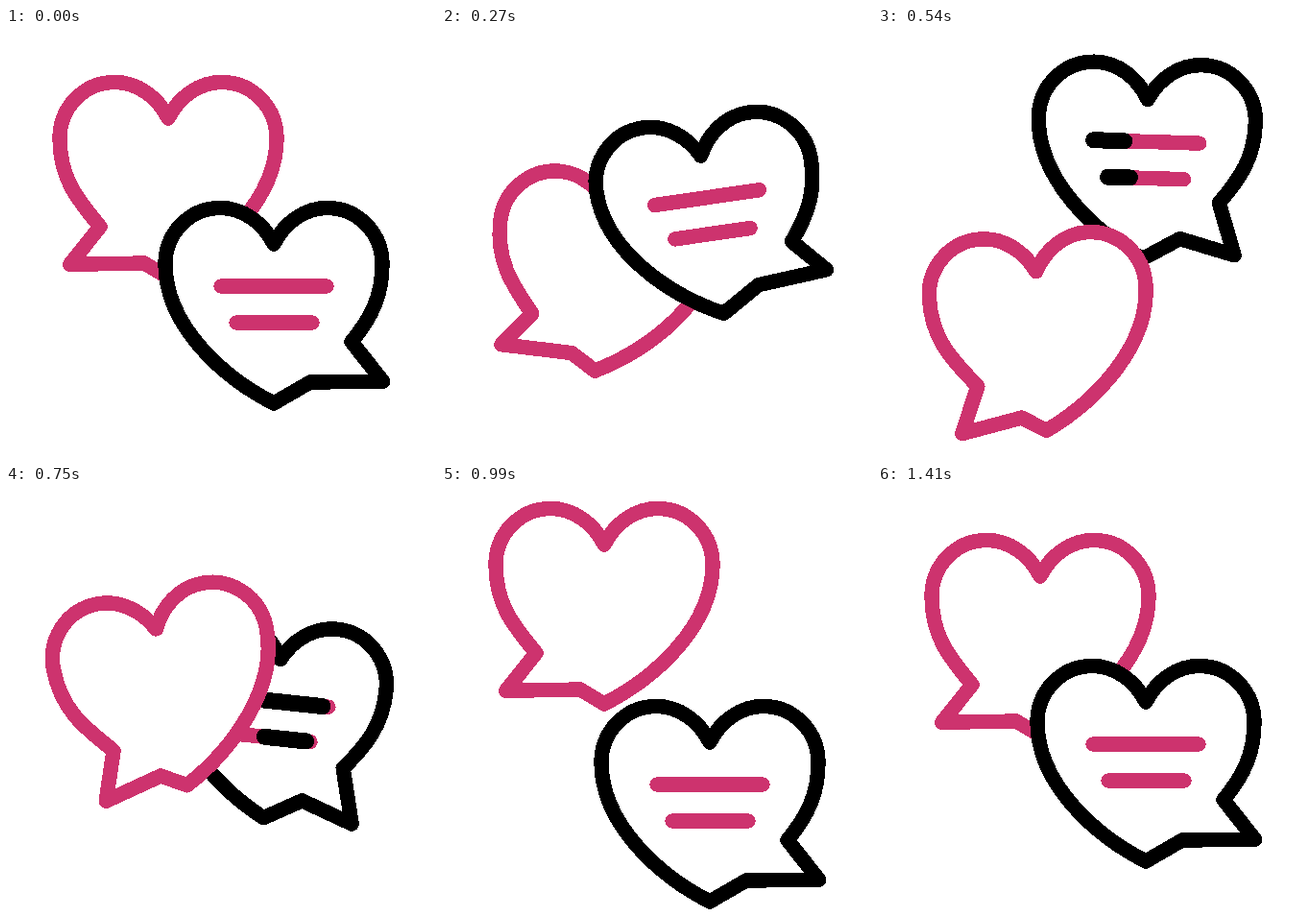
Recreate the animation shown at these times as an HTML page. Size 448x448 px, loop 1.5 s.

```html
<!DOCTYPE html>
<html lang="en">
<head>
<meta charset="utf-8">
<title>Chat hearts</title>
<style>
  html, body { margin: 0; width: 100%; height: 100%; overflow: hidden; background: #fff; }
  svg { display: block; width: 100%; height: 100%; }
  path { fill: none; stroke-width: 15.4; stroke-linecap: round; stroke-linejoin: round; shape-rendering: crispEdges; }
  .heart { fill: #fff; }
  .pink { stroke: #cd336e; }
  .black { stroke: #000; }
  .sweep { stroke-width: 17; }
</style>
</head>
<body>
<svg viewBox="0 0 448 448">
  <g id="pink"><path class="heart pink"/></g>
  <g id="black">
    <path class="heart black"/>
    <path class="pink" d="M-55 -21H55M-39 17H40"/>
    <path class="black sweep"/>
  </g>
</svg>
<script>
const LOOP = 1500, STEP = 30;
const svg = document.querySelector('svg');
const sweep = document.querySelector('.sweep');

// Half of the heart's top, from the notch round to the widest point.
const LOBE = [[0, -65], [11, -87], [32, -102.5], [55.5, -102.5], [88, -102.5], [113, -76], [113, -44]];

// Each heart rests, swings to two extremes and comes back.
// The tail hangs between an inner and an outer joint.
const hearts = [
  { id: 'pink', x: 169, y: 159, side: -1, inner: [25, 86], outer: [71, 48],
    lift: [175, -33], turn: [5.8, -12.2], turnAt: [217, 838], bend: [-6, 21] },
  { id: 'black', x: 279, y: 290, side: 1, inner: [38, 79], outer: [81, 37],
    lift: [-166, 42], turn: [-9, 6.2], turnAt: [200, 728], bend: [-10, 30] }
];

function ease(t, from, to) {
  const u = Math.min(1, Math.max(0, (t - from) / (to - from)));
  return u * u * (3 - 2 * u);
}

// Zero at start, a at t1, b at t2, zero again at end.
function swing(t, [a, b], [t1, t2], start = 60, end = 990) {
  return a * ease(t, start, t1) + (b - a) * ease(t, t1, t2) - b * ease(t, t2, end);
}

function tailPoints({ inner, outer, bend }, t) {
  const b = swing(t, bend, [150, 690]);
  const up = Math.min(b, 0) * 0.45, down = Math.max(b, 0) * 0.15;
  const [ix, iy] = [inner[0] - up, inner[1] + up];
  const [ox, oy] = [outer[0] - down, outer[1] + down];
  const size = 58 - 7 * (ease(t, 150, 360) - ease(t, 750, 990));
  const angle = (20.5 + b) * Math.PI / 180;
  const tip = [(ix + ox) / 2 + size * Math.cos(angle), (iy + oy) / 2 + size * Math.sin(angle)];
  return [[ix, iy], tip, [ox, oy]];
}

function outline(side, tail) {
  const flip = s => ([x, y]) => [x * s, y];
  const plain = LOBE.map(flip(-side));
  const belly = [[113, 20], [53, 74], [0, 101]].map(flip(-side));
  const [ox, oy] = tail[2];
  const flank = [[ox + 22, oy - 27], [113, oy - 49]].map(flip(side));
  const back = LOBE.map(flip(side)).reverse();
  return `M${plain[0]}C${plain.slice(1).join(' ')} ${belly.join(' ')}` +
    `L${tail.map(flip(side)).join(' ')}C${flank.join(' ')} ${back.join(' ')}Z`;
}

function segment(left, right, y, a, b) {
  const w = right - left;
  return `M${left + w * a} ${y}H${left + w * b}`;
}

function draw(t) {
  for (const h of hearts) {
    const g = document.getElementById(h.id);
    const dy = swing(t, h.lift, [450, 990], 60, 1410);
    const deg = swing(t, h.turn, h.turnAt);
    g.setAttribute('transform', `translate(${h.x} ${h.y + dy}) rotate(${deg})`);
    g.firstElementChild.setAttribute('d', outline(h.side, tailPoints(h, t)));
  }

  const end = ease(t, 390, 810), start = ease(t, 570, 990);
  sweep.setAttribute('d', end > start
    ? segment(-55, 55, -21, start, end) + segment(-39, 40, 17, start, end)
    : '');

  // The hearts trade places in depth while they are apart.
  const front = document.getElementById(t >= 450 && t < 990 ? 'pink' : 'black');
  if (svg.lastElementChild !== front) svg.append(front);
}

function tick() {
  const t = performance.now() % LOOP;
  draw(Math.floor(t / STEP) * STEP);
  requestAnimationFrame(tick);
}
tick();
</script>
</body>
</html>
```
